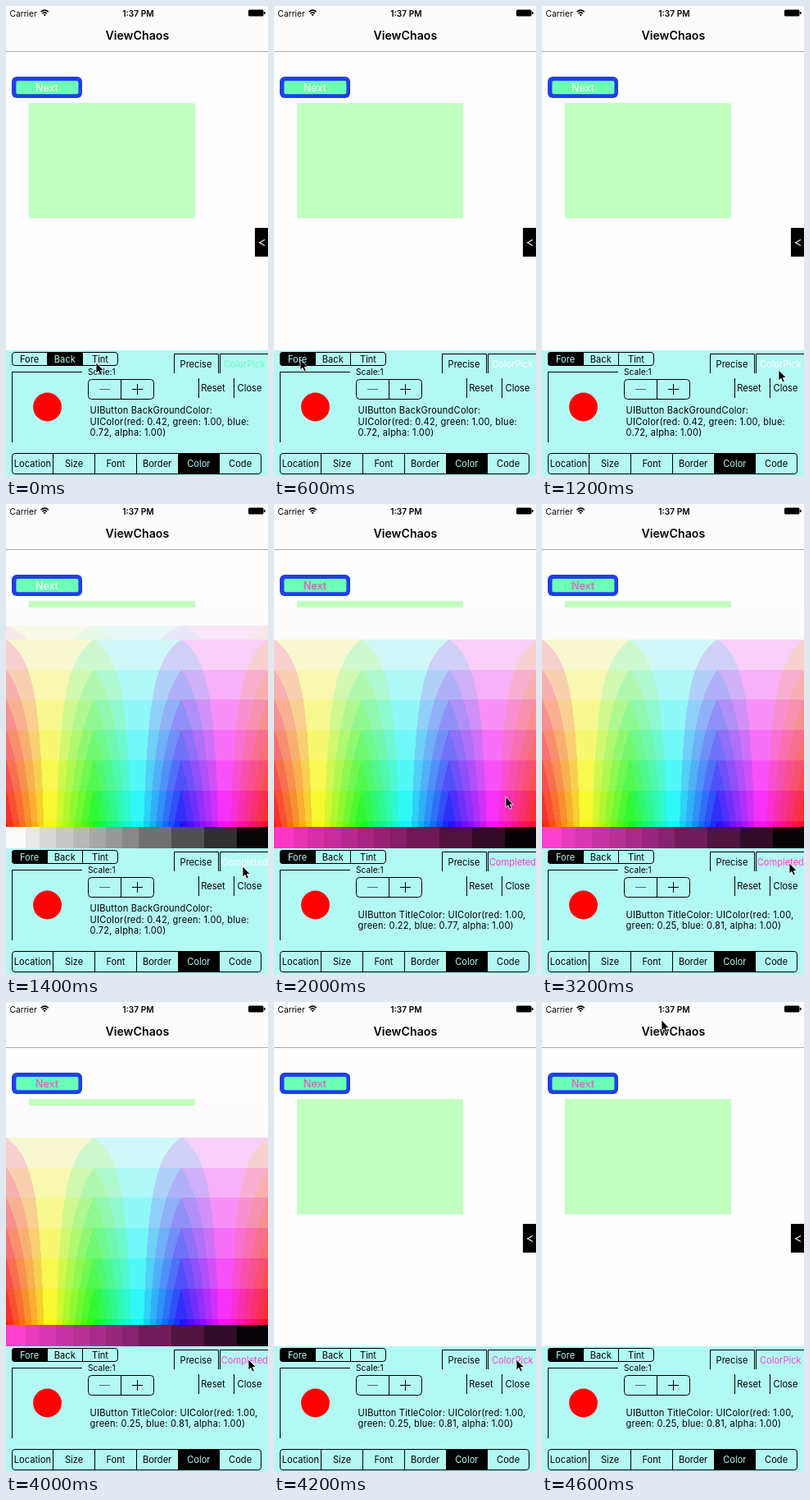
Recreate the animation shown at these times as an HTML page with a canvas. Size 320 by 572 pixels, loop 4.8 s.

```html
<!DOCTYPE html>
<html lang="en">
<head>
<meta charset="utf-8">
<title>ViewChaos</title>
<style>
  html, body { margin: 0; width: 100%; height: 100%; overflow: hidden; background: #fefefe; }
  svg, canvas { position: absolute; left: 0; top: 0; display: block; }
  #picker { top: 126px; }
  text { font: 11.1px Inter, "Liberation Sans", sans-serif; fill: #000; }
  .mid { text-anchor: middle; }
  .line { fill: none; stroke: #000; }
  .info { letter-spacing: .2px; }
</style>
</head>
<body>
<svg id="app" width="320" height="572">
  <rect width="320" height="55" fill="#fcfcfc"/>
  <path d="M0 55.5H320" stroke="#aaa"/>
  <text x="4.5" y="12.5" style="font-size:10.2px">Carrier</text>
  <g fill="none" stroke="#000" stroke-width="1.5">
    <path d="M42.6 7.2Q47.2 3 51.8 7.2M44.4 9.2Q47.2 6.6 50 9.2"/>
  </g>
  <path d="M45.6 10.4Q47.2 9 48.8 10.4L47.2 12.2Z"/>
  <text class="mid" x="161.5" y="12.5" style="font-size:10.2px;font-weight:600">1:37 PM</text>
  <rect x="296" y="4.5" width="18.5" height="8" rx="1.5"/>
  <rect x="315" y="7" width="1.5" height="3"/>
  <text class="mid" x="160.3" y="41" style="font-size:14.2px;font-weight:600">ViewChaos</text>

  <rect x="7" y="86" width="86" height="26" rx="6" fill="#203fe8"/>
  <rect x="12.4" y="91" width="76" height="16.3" rx="2" fill="#6bffb8"/>
  <text id="next" class="mid" x="50" y="103.5" style="font-size:12.6px">Next</text>
  <rect x="28" y="118" width="203" height="140.5" fill="#c3ffc1"/>
  <rect x="304" y="270" width="16" height="35"/>
  <path d="M316 284.5L309.5 288L316 291.5" fill="none" stroke="#fff" stroke-width="1.1"/>

  <rect y="419" width="320" height="153" fill="#b3f9f3"/>
  <g id="modes"></g>
  <g id="tabs"></g>
  <path class="line" d="M205.5 447V423.5H259.5V447M261.5 447V423.5H320M235.5 453V477M278.5 453V477M7.5 531V445.5H93"/>
  <text class="mid" x="232" y="439.8">Precise</text>
  <text id="pick" class="mid" x="291.3" y="439.8"></text>
  <text class="mid" x="253" y="469">Reset</text>
  <text class="mid" x="297.5" y="469">Close</text>
  <text x="100" y="449" style="font-size:10.2px">Scale:1</text>
  <circle cx="50.5" cy="488" r="17.4" fill="#f00"/>
  <rect class="line" x="100.5" y="454.5" width="80" height="24" rx="4"/>
  <path class="line" d="M140.5 454V479M154 466.5H167M160.5 460V473"/>
  <path d="M114 466.5H127" stroke="#567"/>
  <g id="info"></g>
</svg>
<canvas id="picker" width="320" height="293"></canvas>
<svg width="320" height="572">
  <path id="cursor" d="M0 0V13L3 10.3L5 15L7.3 14L5.3 9.5H9.3Z" stroke="#fff" stroke-width=".8"/>
</svg>
<script>
const LOOP = 4800, STEP = 200;
const MINT = [107, 255, 184], WHITE = [255, 255, 255], PANEL = '#b3f9f3';
const SELECT = 600, OPEN = 1400, DRAG = 1600, DROP = 2400, CLOSE = 4200;

// time, x, y of the pointer tip
const path = [
  [0, 110, 434], [200, 78, 440], [400, 26, 427], [600, 32, 430], [800, 32, 460],
  [1000, 300, 452], [1200, 289, 443], [1400, 289, 441], [1600, 286, 380],
  [1800, 284, 362], [2400, 281, 345], [2600, 286, 378], [2800, 294, 416],
  [3000, 301, 436], [3200, 302, 437], [4000, 296, 435], [4200, 296, 435],
  [4400, 190, 51], [4600, 146, 22]
];

const $ = id => document.getElementById(id);
const rgb = c => `rgb(${c.map(Math.round)})`;

function pointer(t) {
  let i = path.length - 1;
  while (path[i][0] > t) i--;
  const a = path[i], b = path[i + 1] || a;
  const k = b === a ? 0 : (t - a[0]) / (b[0] - a[0]);
  return [a[1] + (b[1] - a[1]) * k, a[2] + (b[2] - a[2]) * k];
}

// hue runs across the stage, saturation down it
function colorAt(x, y) {
  const h = x / 320 * 6, s = Math.max(0, y - .5) / 293;
  return [5, 3, 1].map(n => {
    const k = (n + h) % 6;
    return 255 * (1 - s * Math.max(0, Math.min(k, 4 - k, 1)));
  });
}

function segments(labels, x, y, w, h, selected) {
  const right = Math.round(x + w * labels.length);
  let out = `<clipPath id="c${y}"><rect x="${x}" y="${y}" width="${right - x}" height="${h}" rx="4"/></clipPath>`;
  out += `<rect clip-path="url(#c${y})" x="${x + w * selected}" y="${y}" width="${w}" height="${h}"/>`;
  out += `<rect class="line" x="${x + .5}" y="${y + .5}" width="${right - x - 1}" height="${h - 1}" rx="3.5"/>`;
  labels.forEach((label, i) => {
    const left = x + w * i;
    if (i) out += `<path class="line" d="M${Math.floor(left) + .5} ${y}v${h}"/>`;
    out += `<text class="mid" x="${left + w / 2}" y="${y + h / 2 + 4}"` +
      `${i === selected ? ` style="fill:${PANEL}"` : ''}>${label}</text>`;
  });
  return out;
}

function info(lines) {
  const top = lines.length === 3 ? 496 : 503.6;
  return lines.map((s, i) => `<text class="info" x="102.5" y="${top + i * 13.5}">${s}</text>`).join('');
}

// eight steps per channel; near-white stays white or gets one extra pale step
const level = c => c >= 222 ? 248 : Math.floor((c + 2) / 32) * 32 + 16;
const paleLevel = c => c >= 237 ? 248 : 232;

function fieldColor(x, y, fine) {
  const color = colorAt(x, y), low = Math.min(...color);
  if (low >= (fine ? 237 : 222)) return [252, 252, 252];
  return color.map(low >= 222 ? paleLevel : level);
}

function stripLevel(x) {
  const v = 255 * (1 - (x - 2) / 320), size = v > 127 ? 16 : 32;
  return v > 238 ? 252 : v < 32 ? 6 : Math.floor(v / size) * size + size / 2;
}

const ctx = $('picker').getContext('2d');
function drawPicker(base, fine) {
  const image = ctx.createImageData(320, 293);
  for (let y = 0, p = 0; y < 293; y++) {
    for (let x = 0; x < 320; x++, p += 4) {
      const color = y < 267 ? fieldColor(x, y, fine) : base.map(c => c * stripLevel(x) / 255);
      image.data.set([...color, 255], p);
    }
  }
  ctx.putImageData(image, 0, 0);
}

function render(t) {
  const [x, y] = pointer(t);
  const open = t >= OPEN && t < CLOSE, dragged = t >= DRAG;
  const [px, py] = pointer(Math.min(t, DROP));
  const title = dragged ? colorAt(px - 1, py - 126) : WHITE;
  const f = (dragged ? title : MINT).map(c => (c / 255).toFixed(2));

  $('cursor').setAttribute('transform', `translate(${x} ${y})`);
  $('next').style.fill = rgb(title);
  $('pick').style.fill = rgb(t < SELECT ? MINT : title);
  $('pick').textContent = open ? 'Completed' : 'ColorPick';
  $('modes').innerHTML = segments(['Fore', 'Back', 'Tint'], 7, 421, 43.2, 17, t < SELECT ? 1 : 0);
  $('info').innerHTML = info(dragged
    ? [`UIButton TitleColor: UIColor(red: ${f[0]},`, `green: ${f[1]}, blue: ${f[2]}, alpha: 1.00)`]
    : ['UIButton BackGroundColor:', `UIColor(red: ${f[0]}, green: ${f[1]}, blue:`, `${f[2]}, alpha: 1.00)`]);
  $('picker').style.visibility = open ? 'visible' : 'hidden';
  if (open) drawPicker(title, t < 1800);
}

$('tabs').innerHTML = segments(['Location', 'Size', 'Font', 'Border', 'Color', 'Code'], 7, 544, 50.75, 26, 4);

const start = performance.now();
let shown = -1;
function tick() {
  const t = Math.floor((performance.now() - start) % LOOP / STEP) * STEP;
  if (t !== shown) render(shown = t);
  requestAnimationFrame(tick);
}
tick();
</script>
</body>
</html>
```
